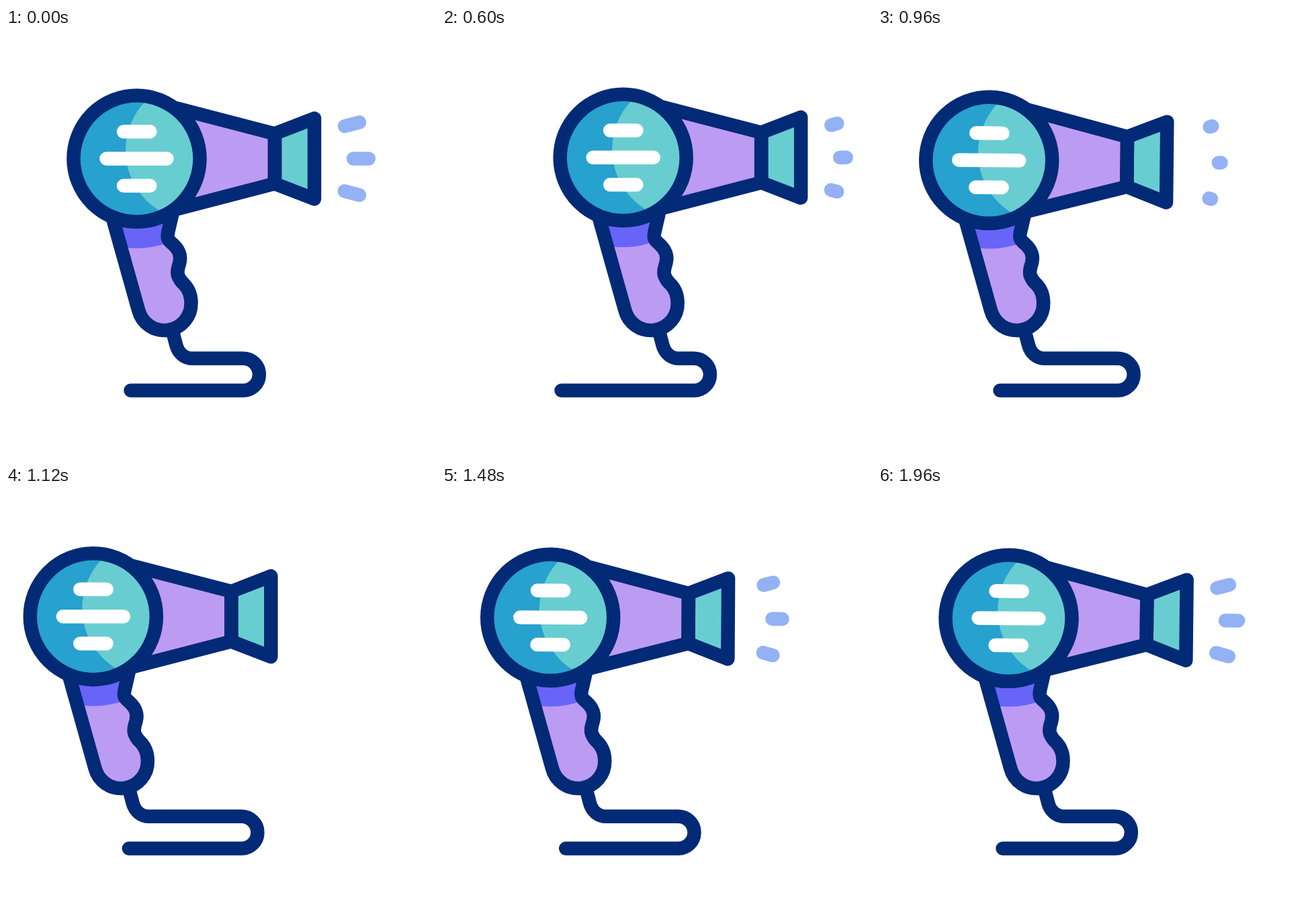
These frames come from a looping animation (640x640 px, 2000 ms). An HTML page with a canvas:

```html
<!DOCTYPE html>
<html lang="en">
<head>
<meta charset="utf-8">
<title>Hair dryer</title>
<style>
html, body { margin: 0; width: 100%; height: 100%; overflow: hidden; background: #fff; }
canvas { display: block; width: 100vmin; height: 100vmin; }
</style>
</head>
<body>
<canvas id="stage" width="640" height="640"></canvas>
<script>
const ctx = document.getElementById('stage').getContext('2d');
const LOOP = 2000, STEP = 40, CX = 194.5, CY = 194.5;
const NAVY = '#032a76', BLUE = '#27a1cd', TEAL = '#68cdd1',
      LILAC = '#bc9bf3', VIOLET = '#6864f8', AIR = '#93b1f5';

// Sway: rest, far right, far left, rest
const KEYS = [0, 560, 1160, 1800];
// Puffs of air: start, full length, gone
const PUFFS = [[-250, 0, 250], [492, 750, 1000], [1130, 1390, 1655], [1750, 2000, 2250]];
// Air dashes relative to the head centre
const DASHES = [
  [309.5, -48.3, 331.5, -54.2],
  [322.5, 0, 345.3, 0],
  [309.3, 48.3, 331.5, 54.2]
];

const clamp = v => Math.max(0, Math.min(1, v));
const smooth = p => p * p * (3 - 2 * p);
const mix = (a, b, p) => a + (b - a) * p;

function sway(t, right, left) {
  const vals = [0, right, left, 0];
  for (let i = 0; i < 3; i++) {
    if (t < KEYS[i + 1]) {
      const p = (t - KEYS[i]) / (KEYS[i + 1] - KEYS[i]);
      return mix(vals[i], vals[i + 1], smooth(p));
    }
  }
  return 0;
}

function stroke(path, color = NAVY) {
  ctx.strokeStyle = color;
  ctx.stroke(path);
}

function fill(path, color) {
  ctx.fillStyle = color;
  ctx.fill(path);
}

function line(x1, y1, x2, y2, color) {
  const p = new Path2D();
  p.moveTo(x1, y1);
  p.lineTo(x2, y2);
  stroke(p, color);
}

function disc(x, y, r) {
  const p = new Path2D();
  p.arc(x, y, r, 0, Math.PI * 2);
  return p;
}

function inside(clip, draw) {
  ctx.save();
  ctx.clip(clip);
  draw();
  ctx.restore();
}

const handle = new Path2D(
  'M247.2 278 L241.2 304 C239.2 313 241.7 316 247.7 321 C257.7 330 261.2 339 258.2 350 ' +
  'C255.7 358 253.7 365 257.2 371 C259.2 375.5 261.7 378.5 265.2 381.5 ' +
  'C271.7 388.5 275.5 398 275.5 409 A39.8 39.8 0 0 1 197.1 419.8 L154.2 267 Z');
const cone = new Path2D('M58.5 -75.3 L205.5 -37.2 V37.2 L58.5 75.3 Z');
const nozzle = new Path2D('M205.5 -37.2 L264.5 -60 V60 L205.5 37.2 Z');
const face = disc(0, 0, 94);

function drawCord(t, dx) {
  const right = 353 + sway(t, 22.4, -2.8);
  const end = 185.5 + sway(t, -8, -2.6);
  const p = new Path2D();
  p.moveTo(247 + dx, 448);
  p.lineTo(253.3 + dx, 472);
  p.bezierCurveTo(256.5 + dx, 484, 266 + dx, 491.8, 278 + dx, 491.8);
  p.lineTo(right, 491.8);
  p.arc(right, 515.7, 23.9, -Math.PI / 2, Math.PI / 2);
  p.lineTo(end, 539.6);
  stroke(p);
}

function drawHandle(dx, dy) {
  ctx.save();
  ctx.translate(dx, 0);
  fill(handle, LILAC);
  inside(handle, () => fill(disc(CX, CY + (dy < 0 ? dy : dy * 0.3), 133.4), VIOLET));
  stroke(handle);
  ctx.restore();
}

function drawHead() {
  fill(nozzle, TEAL);
  fill(cone, LILAC);
  stroke(nozzle);
  stroke(cone);
  fill(face, BLUE);
  inside(face, () => fill(disc(89, -12.4, 105.5), TEAL));
  stroke(face);
  line(-19.5, -40.3, 19.8, -40.3, '#fff');
  line(-45, 0, 45, 0, '#fff');
  line(-19.5, 40.3, 19.8, 40.3, '#fff');
}

function drawAir(t) {
  for (const [start, full, gone] of PUFFS) {
    if (t <= start || t >= gone) continue;
    const a = clamp((t - full) / (gone - full));
    const b = clamp((t - start) / (full - start));
    for (const [x1, y1, x2, y2] of DASHES) {
      line(mix(x1, x2, a), mix(y1, y2, a), mix(x1, x2, b), mix(y1, y2, b), AIR);
    }
  }
}

function draw(t) {
  const dx = sway(t, 77, -66.5);
  const shake = -Math.sin(t / 250 * Math.PI * 2);
  const dy = 2.8 * shake;
  const tilt = Math.max(0, shake) * 0.72 * Math.PI / 180;

  ctx.fillStyle = '#fff';
  ctx.fillRect(0, 0, 640, 640);
  ctx.lineWidth = 20.5;
  ctx.lineCap = ctx.lineJoin = 'round';

  drawCord(t, dx);
  drawHandle(dx, dy);
  ctx.save();
  ctx.translate(CX + dx, CY + dy);
  ctx.rotate(tilt);
  drawHead();
  drawAir(t);
  ctx.restore();
}

const begin = performance.now();
function tick() {
  const t = Math.max(0, performance.now() - begin) % LOOP;
  draw(Math.floor(t / STEP) * STEP);
  requestAnimationFrame(tick);
}
tick();
</script>
</body>
</html>
```
